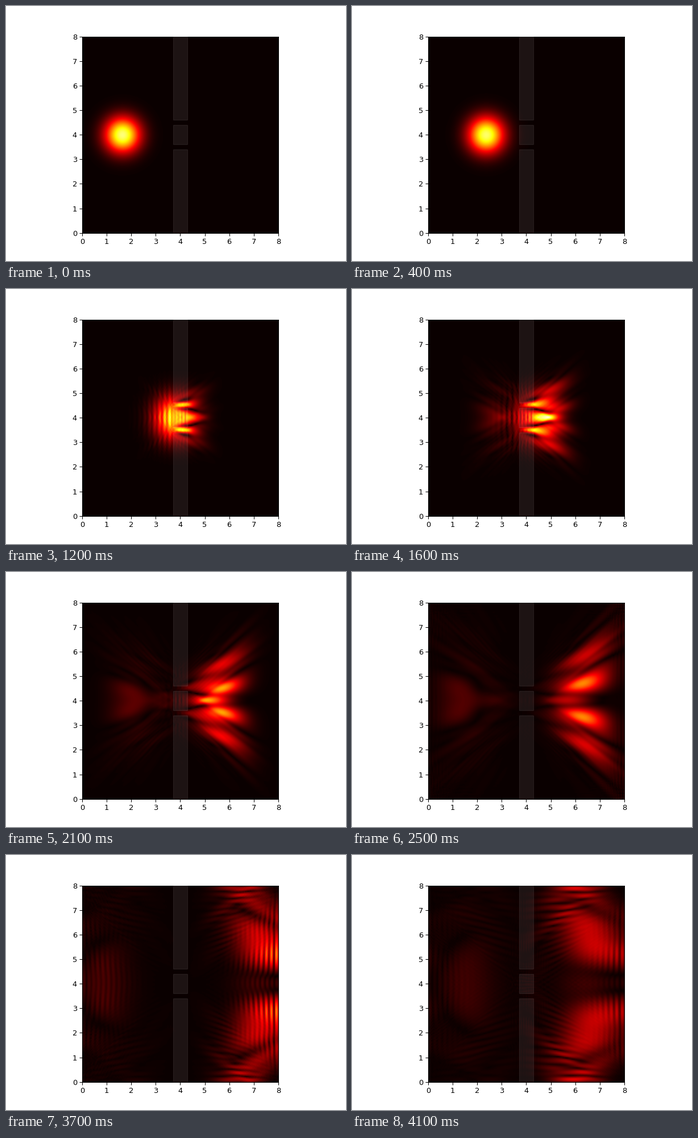
Animation, 598 px wide and 448 px high, one loop 4200 ms. Source, as a matplotlib script:

```python
"""A Gaussian wave packet meets a double slit (Crank-Nicolson, 2D Schrodinger)."""
import numpy as np
import matplotlib.pyplot as plt
from matplotlib.animation import FuncAnimation
from matplotlib.patches import Rectangle

# Box and grid
SIZE = 8.0
DX = 0.05
DT = DX**2 / 4
N = 159                      # interior points per side
STEPS = 500

# Wall with two slits
THICK, GAP, SLIT = 0.6, 0.8, 0.2
V0 = 200.0
WALL_X = (SIZE - THICK) / 2
LOW, HIGH = (SIZE - GAP) / 2, (SIZE + GAP) / 2

# Playback
FRAMES = 42
INTERVAL = 100
STRIDE, FIRST = 12, 4

SCALE = 598 / 640


def start_packet():
    p = DX * np.arange(1, N + 1)
    x, y = np.meshgrid(p, p)
    r2 = (x - SIZE / 5)**2 + (y - SIZE / 2)**2
    return np.exp(-r2 / (2 * 0.5**2)) * np.exp(15j * np.pi * (x - SIZE / 5))


def cell(pos):
    return int(round(pos / DX))


def simulate():
    """Return |psi| at the shown steps and the peak over the whole run."""
    k = np.arange(1, N + 1)
    sine = np.sqrt(2 / (N + 1)) * np.sin(np.pi * np.outer(k, k) / (N + 1))
    sine = sine.astype(complex)
    energy = (2 - 2 * np.cos(np.pi * k / (N + 1))) / DX**2
    free = 1 / (1 + 0.5j * DT * (energy[:, None] + energy[None, :]))

    cols = slice(cell(WALL_X) - 1, cell(WALL_X + THICK) - 1)
    to_wall = np.ascontiguousarray(sine[:, cols])
    from_wall = np.ascontiguousarray(sine[cols, :])
    wall = np.full((N, 1), 0.5j * DT * V0)
    for edge in (LOW - SLIT, HIGH):
        wall[cell(edge) - 1:cell(edge + SLIT) - 1] = 0

    coef = sine @ start_packet() @ sine
    half = free * coef
    shown, peak = [], 0.0
    for step in range(STEPS):
        mod = np.abs(sine @ coef @ sine)
        peak = max(peak, mod.max())
        if step % STRIDE == FIRST:
            shown.append(mod)
        # The potential is a small term, so fixed-point iteration converges fast
        for _ in range(5):
            inside = wall * (sine @ (half @ to_wall))
            half = free * (coef - (sine @ inside) @ from_wall)
        coef = 2 * half - coef
    return shown, peak


waves, peak = simulate()

plt.rcParams.update({
    "font.family": "DejaVu Sans",
    "font.size": 10 * SCALE,
    "axes.linewidth": 0.8 * SCALE,
})
for axis in ("xtick", "ytick"):
    plt.rcParams[axis + ".major.size"] = 3.5 * SCALE
    plt.rcParams[axis + ".major.width"] = 0.8 * SCALE
    plt.rcParams[axis + ".major.pad"] = 3.5 * SCALE

fig = plt.figure(figsize=(5.98, 4.48), dpi=100)
ax = fig.add_subplot(xlim=(0, SIZE), ylim=(0, SIZE))
image = ax.imshow(waves[0], extent=[0, SIZE, 0, SIZE], cmap="hot",
                  vmin=0, vmax=peak, interpolation="bilinear", zorder=1)
ax.set_xticks(range(9))
ax.set_yticks(range(9))

for bottom, top in ((0, LOW - SLIT), (LOW, HIGH), (HIGH + SLIT, SIZE)):
    ax.add_patch(Rectangle((WALL_X, bottom), THICK, top - bottom, color="w",
                           alpha=0.08, lw=SCALE, zorder=50))


def update(i):
    image.set_data(waves[i])
    return [image]


anim = FuncAnimation(fig, update, frames=FRAMES, interval=INTERVAL,
                     repeat=True, repeat_delay=0)
plt.show()
```
